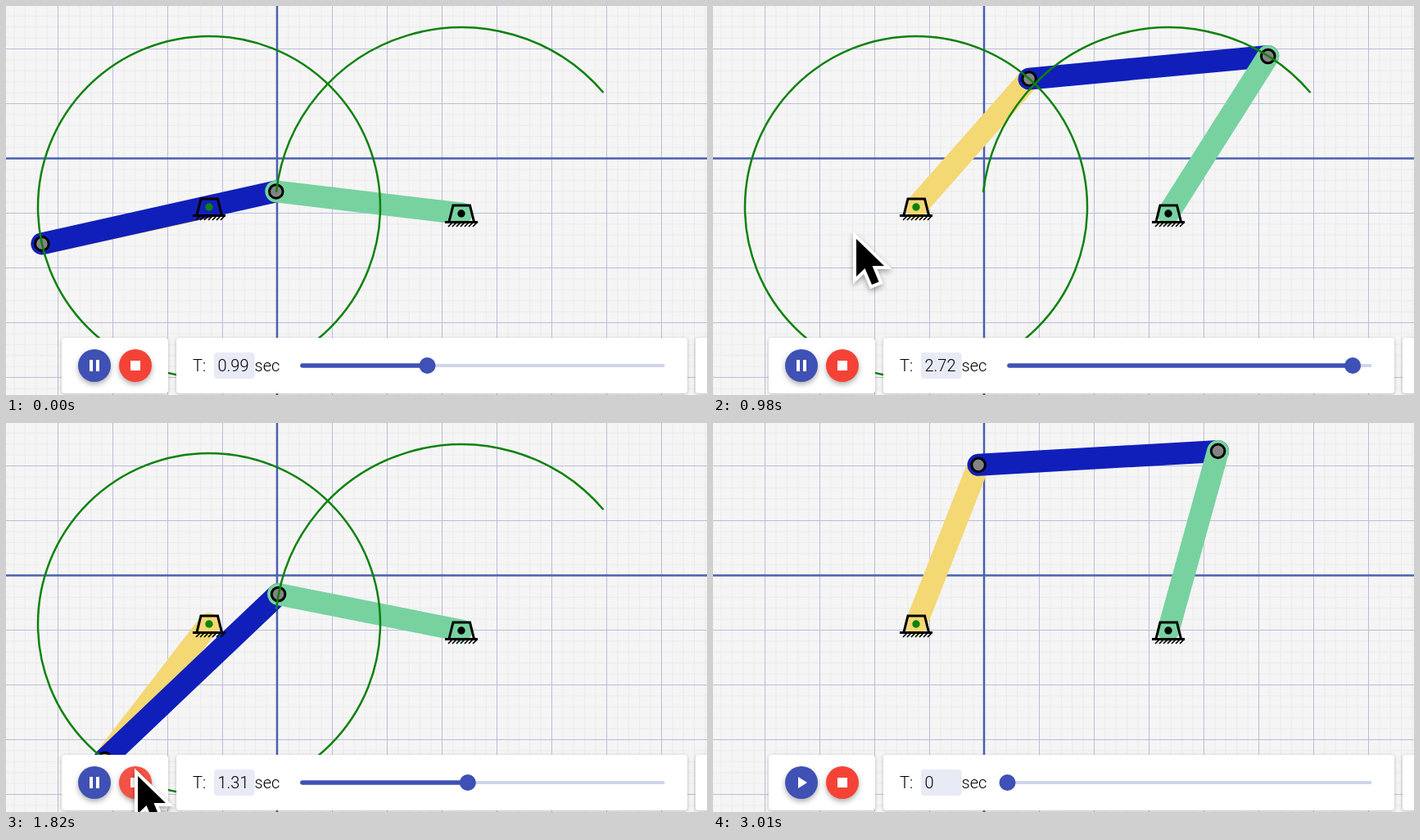
An HTML page that plays this animation: 856x476 px, repeating every 4.13 s.

```html
<!DOCTYPE html>
<html lang="en">
<head>
<meta charset="utf-8">
<title>Four-bar linkage</title>
<style>
  html, body { margin: 0; width: 100%; height: 100%; overflow: hidden; background: #f5f5f5; }
  svg { display: block; width: 100%; height: 100%; }
  text { font: 300 20px Roboto, sans-serif; fill: #000; }
  .link { stroke-width: 27; stroke-linecap: round; }
  .pin { fill: #838383; stroke: #000; stroke-width: 3; }
  .trace { fill: none; stroke: #0c820c; stroke-width: 2.5; }
  .card { fill: #fff; filter: drop-shadow(0 1px 2px rgba(0, 0, 0, .25)); }
  .fab { filter: drop-shadow(0 3px 3px rgba(0, 0, 0, .32)); }
  .arrow { fill: #000; stroke: #fff; stroke-width: 8; stroke-miterlimit: 8; paint-order: stroke; }
  #cursor { filter: drop-shadow(0 3px 3px rgba(0, 0, 0, .35)); }
</style>
</head>
<body>
<svg viewBox="0 0 856 476">
  <defs>
    <g id="ground" fill="none" stroke="#000" stroke-width="3">
      <path d="M-15 10L-10 -10H10.5L15.5 10M-20 10.5H20"/>
      <path stroke-width="1.6" d="M-11 11l-5 5m10 -5l-5 5m10 -5l-5 5m10 -5l-5 5m10 -5l-5 5m10 -5l-5 5m10 -5l-5 5"/>
    </g>
  </defs>
  <rect width="856" height="476" fill="#f5f5f5"/>
  <path id="minor" stroke="#ebebeb"/>
  <path id="major" stroke="#bcbcdb"/>
  <path d="M331 0V476M0 186.5H856" stroke="#4a60b0" stroke-width="2.5"/>

  <line id="crank" class="link" stroke="#f3d874"/>
  <line id="coupler" class="link" stroke="#101fba"/>
  <line id="rocker" class="link" stroke="#77d2a0"/>
  <circle id="pinP" class="pin" r="8.3"/>
  <circle id="pinQ" class="pin" r="8.3"/>
  <use href="#ground" x="248" y="246"/>
  <use href="#ground" x="556" y="254"/>
  <circle cx="556" cy="254" r="4.7"/>
  <g id="traces" class="trace">
    <circle cx="248" cy="246" r="209"/>
    <path d="M330 228A227.8 227.8 0 0 1 729.5 106"/>
  </g>
  <circle cx="248" cy="246" r="4.7" fill="#0c820c"/>

  <rect class="card" x="68" y="406" width="130" height="68" rx="4"/>
  <rect class="card" x="208" y="406" width="624" height="68" rx="4"/>
  <rect class="card" x="842" y="406" width="40" height="68" rx="4"/>
  <circle class="fab" cx="108" cy="440" r="20" fill="#3f51b5"/>
  <path id="pause" d="M102 433h4v14h-4zM110 433h4v14h-4z" fill="#fff"/>
  <path id="play" d="M104 433v14l11 -7z" fill="#fff"/>
  <circle class="fab" cx="158" cy="440" r="20" fill="#f44336"/>
  <circle id="glow" cx="158" cy="440" r="20" fill="#fff"/>
  <rect x="152" y="434" width="12" height="12" fill="#fff"/>

  <text x="228" y="447">T:</text>
  <rect x="254" y="424" width="49.5" height="32" rx="4" fill="#e8eaf6"/>
  <text id="time" x="258.5" y="447"></text>
  <text x="303.5" y="447">sec</text>
  <path d="M361 440H802.5" stroke="#cfd4e9" stroke-width="4" stroke-linecap="round"/>
  <line id="bar" x1="362" y1="440" y2="440" stroke="#3f51b5" stroke-width="5.5" stroke-linecap="round"/>
  <circle id="thumb" cy="440" r="10" fill="#3f51b5"/>

  <g id="cursor"><path class="arrow" d="M4 10V56L14.5 46L23 66L31.5 62.5L23.5 43H38Z"/></g>
</svg>
<script>
const LOOP = 4130, STEP = 70, STOP = 2100, PERIOD = 2.88;
const A = [248, 246], B = [556, 254];
const CRANK = 209, COUPLER = 293, ROCKER = 227.8;
const START = 68.65, SPEED = 125; // degrees, degrees per second

// [ms, simulated seconds] and [ms, x, y]
const clock = [[0, .99], [630, 2.1], [980, 2.72], [1330, 3.31], [1820, 4.19], [2100, 4.69]];
const pointer = [[0, 158, -83], [630, 164, 147], [980, 171, 275], [1330, 166, 385],
                 [1540, 159, 420], [1820, 157, 422], [2100, 158, 424], [2660, 158, 424], [2940, 159, 482]];

const $ = id => document.getElementById(id);
const set = (id, attrs) => { for (const k in attrs) $(id).setAttribute(k, attrs[k]); };
const show = (id, on) => set(id, { visibility: on ? 'visible' : 'hidden' });

function sample(keys, ms) {
  const i = keys.findIndex(k => k[0] > ms);
  if (i < 0) return keys[keys.length - 1].slice(1);
  const [a, b] = [keys[i - 1], keys[i]];
  const f = (ms - a[0]) / (b[0] - a[0]);
  return a.slice(1).map((v, n) => v + (b[n + 1] - v) * f);
}

function gridPath(step) {
  let d = '';
  for (let x = 331.5 % step; x < 856; x += step) d += `M${x} 0V476`;
  for (let y = 186.5 % step; y < 476; y += step) d += `M0 ${y}H856`;
  return d;
}

function crankEnd(sec) {
  const a = (START + SPEED * sec) * Math.PI / 180;
  return [A[0] + CRANK * Math.cos(a), A[1] - CRANK * Math.sin(a)];
}

// Upper crossing of the coupler circle around p and the rocker circle around B
function rockerEnd(p) {
  const dx = B[0] - p[0], dy = B[1] - p[1], d = Math.hypot(dx, dy);
  const along = (d * d + COUPLER ** 2 - ROCKER ** 2) / (2 * d);
  const off = Math.sqrt(Math.max(0, COUPLER ** 2 - along ** 2));
  return [p[0] + (along * dx + off * dy) / d, p[1] + (along * dy - off * dx) / d];
}

const link = (id, p, q) => set(id, { x1: p[0], y1: p[1], x2: q[0], y2: q[1] });
const pin = (id, p) => set(id, { cx: p[0], cy: p[1] });

function draw(ms) {
  const running = ms < STOP;
  const sec = running ? sample(clock, ms)[0] % PERIOD : 0;
  const p = crankEnd(sec), q = rockerEnd(p);
  link('crank', A, p);
  link('coupler', p, q);
  link('rocker', B, q);
  pin('pinP', p);
  pin('pinQ', q);
  show('traces', running);
  show('pause', running);
  show('play', !running);

  $('time').textContent = +sec.toFixed(2);
  const x = running ? 362 + 154.1 * sec : 359.5;
  set('thumb', { cx: x });
  set('bar', { x2: Math.max(x, 362) });
  show('bar', running);

  const [cx, cy] = sample(pointer, ms);
  set('cursor', { transform: `translate(${cx} ${cy})` });
  show('cursor', ms < 2940);
  const hover = ms >= 1540 && ms < 2870 ? .08 : 0;
  const ripple = ms >= STOP && ms < 2380 ? .14 * (2380 - ms) / 280 : 0;
  set('glow', { opacity: hover + ripple });
}

set('minor', { d: gridPath(13.4) });
set('major', { d: gridPath(67) });

const begin = performance.now();
function tick() {
  const ms = (performance.now() - begin) % LOOP;
  draw(Math.floor(ms / STEP) * STEP);
  requestAnimationFrame(tick);
}
tick();
</script>
</body>
</html>
```
